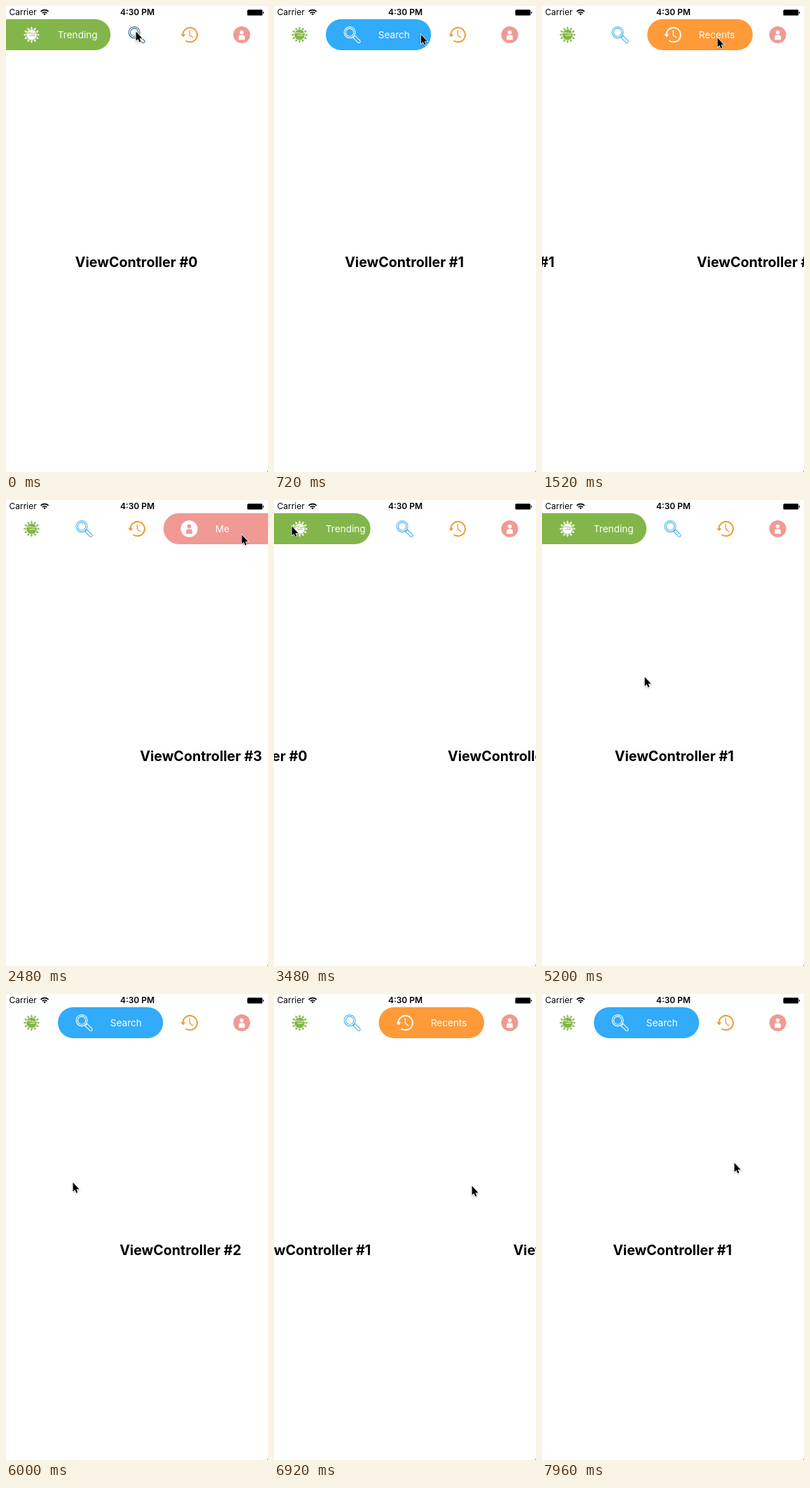
Write an HTML page that moves like this. It is 374x664 px and loops after 8 s.

```html
<!DOCTYPE html>
<html lang="en">
<head>
<meta charset="utf-8">
<title>Tab switcher</title>
<style>
  html, body { margin: 0; width: 100%; height: 100%; overflow: hidden; background: #fff; }
  svg { display: block; width: 100%; height: 100%; font-family: Inter, Roboto, sans-serif; }
  .status { font-size: 12px; }
  .page { font-size: 19.65px; font-weight: 700; text-anchor: middle; }
  .label { font-size: 13.6px; font-weight: 400; fill: #fff; }
  .icon .line { fill: none; stroke: var(--fg); }
  .icon .solid { fill: var(--fg); }
  .icon .cut { fill: var(--bg); }
  .icon .cutline { fill: none; stroke: var(--bg); }
</style>
</head>
<body>
<svg viewBox="0 0 374 664">
  <rect width="374" height="664" fill="#fff"/>
  <g id="pages"></g>
  <rect id="pill" y="18.7" height="44.3" rx="22.1"/>
  <g id="tabs"></g>

  <text class="status" x="4.5" y="13.4">Carrier</text>
  <g fill="none" stroke="#000" stroke-width="1.7">
    <path d="M49.6 7.9a8 8 0 0 1 11 0M51.7 10.1a5 5 0 0 1 6.8 0"/>
    <path d="M55.1 13.2l-1.7-1.8a2.5 2.5 0 0 1 3.4 0z" fill="#000" stroke="none"/>
  </g>
  <text class="status" x="187.5" y="13.4" font-weight="600" text-anchor="middle">4:30 PM</text>
  <rect x="344.4" y="5.2" width="21.8" height="8.4" rx="1.6"/>
  <path d="M367 7.4q2.4 2 0 4z"/>
  <rect x="373" y="662" width="1" height="2" fill="#999"/>

  <path id="cursor" d="M.6 .6V13.6L3.5 10.9 5.4 15.4 7.4 14.5 5.5 10.2H9.6Z" stroke="#fff" stroke-width="1.6"
        paint-order="stroke" style="filter:drop-shadow(0 1px 1px #0004)"/>
</svg>
<script>
const LOOP = 8000, PAGE = 375, CELL = 75;
const $ = id => document.getElementById(id);

const ray = a => `<path class="solid" transform="rotate(${a})" d="M-1.8 -8.3L0 -12 1.8 -8.3Z"/>`;
const sun = `<circle class="solid" r="7.4"/>` +
  Array.from({ length: 12 }, (_, i) => ray(i * 30)).join('') +
  `<path class="cutline" stroke-width=".9" d="M-3 .8H5M-6.4 -2.2Q-3 -3.8 0 -2.4T6.6 -2.4"/>`;
const lens = `<g class="line" stroke-width="1.1"><circle cx="-3.4" cy="-3.4" r="8"/>
  <circle cx="-3.4" cy="-3.4" r="5.7"/><path d="M1.4 4.2L4.2 1.4 11.4 8.6Q12.2 9.6 11 10.9T8.6 11.4Z"/></g>`;
const clock = `<path class="line" stroke-width="2" d="M-9 1A10.2 10.2 0 1 1 -5 8.2"/>
  <path class="solid" d="M-12 -.8H-5.2L-8.6 3.4Z"/>
  <path class="line" stroke-width="1.3" d="M.8 -6.5V.6L5.8 4.2"/>`;
const person = `<circle class="solid" r="12"/><circle class="cut" cy="-3.4" r="2.8"/>
  <path class="cut" d="M-4.4 7.2V2.8Q-4.4 .4 -2.1 .4H2.1Q4.4 .4 4.4 2.8V7.2Z"/>`;

const tabs = [
  { label: 'Trending', icon: sun, pill: [131, 182, 74], tint: [132, 181, 72] },
  { label: 'Search', icon: lens, pill: [49, 171, 250], tint: [72, 178, 230] },
  { label: 'Recents', icon: clock, pill: [255, 154, 56], tint: [240, 154, 50] },
  { label: 'Me', icon: person, pill: [240, 153, 149], tint: [240, 154, 148] }
];
// Pill edges per tab; the outer ones run past the stage.
const pillLeft = [-25, 74, 149.5, 224.6];
const pillRight = [149.2, 224.2, 300, 400];

// [time, from, to]
const selections = [
  [70, 0, 1], [1355, 1, 2], [2295, 2, 3], [3370, 3, 0],
  [5268, 0, 1], [6292, 1, 2], [7314, 2, 1]
];
const TAPS = 4, PRESS = 100;
const tapCurve = bezier(.33, .1, .38, 1), dragCurve = bezier(.2, .13, .28, 1);
const scrolls = selections.map(([at, from, to], i) => i < TAPS
  ? { at, from, to, length: 350, curve: tapCurve }
  : { at: at - 620, from, to, length: 620, curve: dragCurve });

// [time, x, y]
const cursorPath = [
  [0, 185, 36], [400, 187, 38], [1200, 250, 44], [1520, 250, 45], [1750, 255, 46],
  [2200, 335, 48], [2480, 336, 49], [2650, 334, 48], [3150, 24, 27], [3360, 25, 36],
  [3480, 25, 37], [4000, 25, 37], [4560, 185, 236], [4640, 180, 237], [4680, 160, 237],
  [4820, 70, 242], [4960, 60, 244], [5500, 265, 262], [5672, 262, 264], [5880, 100, 268],
  [6000, 95, 268], [6690, 97, 270], [6900, 282, 273], [7320, 284, 274], [7960, 274, 240], [8000, 274, 240]
];

function bezier(x1, y1, x2, y2) {
  const at = (a, b, u) => 3 * (1 - u) ** 2 * u * a + 3 * (1 - u) * u * u * b + u ** 3;
  return x => {
    let lo = 0, hi = 1;
    for (let i = 0; i < 24; i++) {
      const mid = (lo + hi) / 2;
      if (at(x1, x2, mid) < x) lo = mid; else hi = mid;
    }
    return at(y1, y2, (lo + hi) / 2);
  };
}
const clamp = v => Math.max(0, Math.min(1, v));
const lerp = (a, b, k) => a + (b - a) * k;
const rgb = (a, b, k) => `rgb(${a.map((v, i) => Math.round(lerp(v, b[i], clamp(k))))})`;
const WHITE = [255, 255, 255];

function spring(ms) {
  if (ms <= 0) return 0;
  if (ms > 320) return 1;
  const s = ms / 1000, damping = .7, w = 39.5, wd = w * Math.sqrt(1 - damping ** 2);
  return 1 - Math.exp(-damping * w * s) * (Math.cos(wd * s) + damping * w / wd * Math.sin(wd * s));
}

$('pages').innerHTML = tabs.map((_, i) =>
  `<text class="page" x="186.1" y="371.5">ViewController #${i}</text>`).join('');
$('tabs').innerHTML = tabs.map(tab =>
  `<g><g class="icon" transform="translate(36.5 41)">${tab.icon}</g><text class="label" x="73.8" y="46">${tab.label}</text></g>`).join('');
const pageNodes = [...$('pages').children];
const tabNodes = [...$('tabs').children];

const latest = (list, test) => list.filter(test).pop();

function drawTabs(t) {
  const [at, from, to] = latest(selections, s => s[0] <= t) || [-LOOP, 0, 0];
  const slide = spring(t - at), swap = 1 - (1 - clamp((t - at) / 100)) ** 2;
  const left = lerp(pillLeft[from], pillLeft[to], slide);
  const right = lerp(pillRight[from], pillRight[to], slide);
  $('pill').setAttribute('x', left);
  $('pill').setAttribute('width', right - left);
  $('pill').setAttribute('fill', rgb(tabs[from].pill, tabs[to].pill, slide));

  const pressed = selections.slice(0, TAPS).find(s => t >= s[0] - PRESS && t < s[0]);
  tabs.forEach((tab, i) => {
    const place = selected => (i + (i > selected)) * CELL;
    const active = lerp(+(i === from), +(i === to), swap);
    const [icon, label] = tabNodes[i].children;
    tabNodes[i].setAttribute('transform', `translate(${lerp(place(from), place(to), swap)} 0)`);
    icon.style.setProperty('--fg', rgb(tab.tint, WHITE, active));
    icon.style.setProperty('--bg', rgb(WHITE, tab.pill, active));
    icon.style.filter = pressed && pressed[2] === i ? 'brightness(.62)' : 'none';
    label.style.opacity = active;
  });
}

function drawPages(t) {
  const { at, from, to, length, curve } = latest(scrolls, s => s.at <= t) ||
    { at: -LOOP, from: 0, to: 0, length: 1, curve: tapCurve };
  const done = t >= at + length ? 1 : curve((t - at) / length);
  const direction = Math.sign(to - from);
  pageNodes.forEach((node, i) => {
    const shown = i === to || (i === from && done < 1);
    const x = direction * PAGE * (i === to ? 1 - done : -done);
    node.style.display = shown ? '' : 'none';
    node.setAttribute('transform', `translate(${x} 0)`);
  });
}

function drawCursor(t) {
  const next = cursorPath.findIndex(p => p[0] > t);
  const a = cursorPath[next - 1], b = cursorPath[next];
  const u = (t - a[0]) / (b[0] - a[0]), k = u * u * (3 - 2 * u);
  $('cursor').setAttribute('transform', `translate(${lerp(a[1], b[1], k)} ${lerp(a[2], b[2], k)})`);
}

const start = performance.now();
function frame() {
  const t = (performance.now() - start) % LOOP;
  drawTabs(t);
  drawPages(t);
  drawCursor(t);
  requestAnimationFrame(frame);
}
frame();
</script>
</body>
</html>
```
